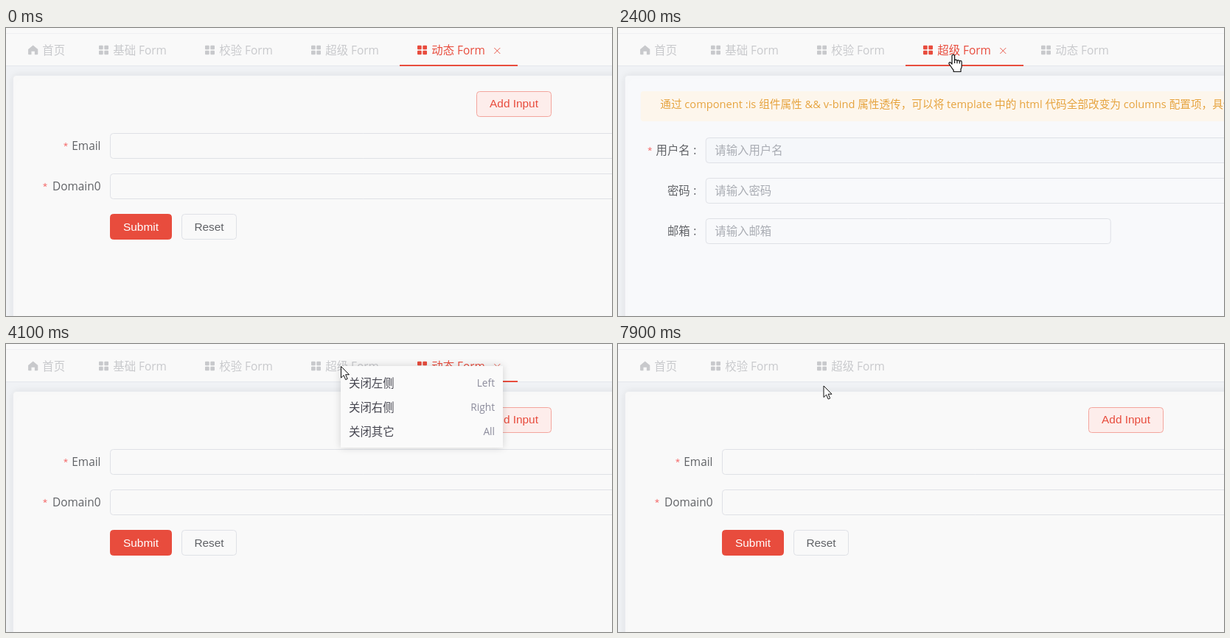
These frames come from a looping animation (822x392 px, 8 s). An HTML page with a canvas:

```html
<!DOCTYPE html>
<html lang="zh-CN">
<head>
<meta charset="utf-8">
<title>Dynamic form tabs</title>
<style>
  html, body { margin: 0; width: 100%; height: 100%; overflow: hidden; background: #f0f2f5; }
  canvas { display: block; }
</style>
</head>
<body>
<canvas id="stage" width="822" height="392"></canvas>
<script>
const ctx = document.getElementById('stage').getContext('2d');
const LOOP = 8000, W = 822, H = 392;
const UI = '"Open Sans","Noto Sans","Noto Sans CJK SC","Noto Sans CJK",sans-serif';
const ARIAL = '"Liberation Sans",Arial,sans-serif';
const RED = '#e84c3d', PAPER = '#f9f9f9', COOL = '#f8f9fb';
const BORDER = '#dfe1e6', LABEL = '#606266', HINT = '#a8abb2';

// CSS "ease" curve
function ease(x) {
  if (x <= 0) return 0;
  if (x >= 1) return 1;
  const bez = (a, b, u) => 3 * a * u * (1 - u) ** 2 + 3 * b * u * u * (1 - u) + u ** 3;
  let lo = 0, hi = 1;
  for (let i = 0; i < 18; i++) {
    const mid = (lo + hi) / 2;
    if (bez(0.25, 0.25, mid) < x) lo = mid; else hi = mid;
  }
  return bez(0.1, 1, lo);
}
const ramp = (t, start, dur = 300) => ease((t - start) / dur);
const pulse = (t, on, off) => ramp(t, on) - ramp(t, off);
const mix = (a, b, k) => a + (b - a) * k;
const mixRGB = (a, b, k) => `rgb(${a.map((v, i) => Math.round(mix(v, b[i], k)))})`;

function text(str, x, y, color, size = 15.4, align = 'left', family = UI) {
  ctx.font = `${size}px ${family}`;
  ctx.textAlign = align;
  ctx.fillStyle = color;
  ctx.fillText(str, x, y);
}
function rect(x, y, w, h, color) {
  ctx.fillStyle = color;
  ctx.fillRect(x, y, w, h);
}
function box(x, y, w, h, fill, stroke, r = 4) {
  ctx.beginPath();
  ctx.roundRect(x + 0.5, y + 0.5, w - 1, h - 1, r);
  ctx.fillStyle = fill;
  ctx.fill();
  ctx.lineWidth = 1;
  ctx.strokeStyle = stroke;
  ctx.stroke();
}
function shadowed(blur, color, draw) {
  ctx.save();
  ctx.shadowBlur = blur;
  ctx.shadowColor = color;
  draw();
  ctx.restore();
}

// Tabs
const tabs = [
  { name: '首页', home: true, width: 96 },
  { name: '基础 Form', closed: 7400 },
  { name: '校验 Form', hover: t => pulse(t, 5550, 6750) },
  { name: '超级 Form',
    active: t => pulse(t, 2060, 2960),
    hover: t => pulse(t, 1460, 2600) + pulse(t, 3480, 3780) },
  { name: '动态 Form', closed: 4950,
    active: t => 1 - pulse(t, 2060, 2960),
    hover: t => pulse(t, 2640, 3480) }
];

function gridIcon(x, y, color) {
  ctx.fillStyle = color;
  ctx.beginPath();
  for (const dx of [0, 7.3]) for (const dy of [0, 7]) ctx.roundRect(x + dx, y + dy, 5.7, 5.5, 1);
  ctx.fill();
}
function homeIcon(x, y, color) {
  ctx.fillStyle = color;
  ctx.fill(new Path2D(`M${x + 6.7} ${y}l6.6 5.6v6.2q0 1-1 1h-3.4v-4.6h-4.4v4.6h-3.4q-1 0-1-1v-6.2z`));
}
function cross(x, y, color, alpha) {
  ctx.save();
  ctx.globalAlpha *= alpha;
  ctx.strokeStyle = color;
  ctx.lineWidth = 0.9;
  ctx.beginPath();
  ctx.moveTo(x - 4, y - 4); ctx.lineTo(x + 4, y + 4);
  ctx.moveTo(x + 4, y - 4); ctx.lineTo(x - 4, y + 4);
  ctx.stroke();
  ctx.restore();
}
function drawTabs(t) {
  rect(0, 0, W, 51, PAPER);
  rect(0, 7, W, 1, '#eff0f2');
  rect(0, 51, W, 1, '#e4e7ed');
  const current = t < 2050 || t >= 2950 ? tabs[4] : tabs[3];
  let left = 6;
  for (const tab of tabs) {
    if (t >= tab.closed) continue;
    const a = tab.active ? tab.active(t) : 0;
    const h = tab.hover ? tab.hover(t) : 0;
    const color = mixRGB([200, 201, 204], [232, 76, 61], a);
    const x = left + 24 - 8 * h * (1 - a);
    (tab.home ? homeIcon : gridIcon)(x, tab.home ? 23.5 : 23.7, color);
    text(tab.name, x + 19.3, 36, color);
    cross(x + 108.3, 31, color, Math.max(a, h));
    const base = tab.width || 144;
    const growth = tab === current ? a ** 0.35 : a;
    if (tab === current) rect(left, 50, base + 16 * growth, 2, RED);
    left += base + 16 * growth;
  }
}

// Pages
function card(fill) {
  shadowed(11, 'rgba(0,0,0,.07)', () => box(9, 64, W + 40, H, fill, '#e9ebef'));
}
function input(x, y, w, fill) {
  box(x, y, w, 35, fill, BORDER);
}
function star(x, y) {
  text('*', x, y, '#f56c6c', 15.4, 'left', ARIAL);
}
function dynamicPage() {
  card(PAPER);
  box(638, 86, 102, 35, '#fdedeb', '#f3a59d');
  text('Add Input', 689, 108, RED, 15.4, 'center', ARIAL);
  [['Email', 143, 78], ['Domain0', 198, 50]].forEach(([label, y, starX]) => {
    star(starX, y + 23);
    text(label, 128.5, y + 23, LABEL, 15.4, 'right');
    input(141, y, W, PAPER);
  });
  box(141, 253, 84, 35, RED, RED);
  text('Submit', 183, 276, '#fff', 15.4, 'center', ARIAL);
  box(238, 253, 75, 35, PAPER, BORDER);
  text('Reset', 275.5, 276, LABEL, 15.4, 'center', ARIAL);
}
function superPage() {
  card(COOL);
  ctx.fillStyle = '#fdf6ec';
  ctx.beginPath();
  ctx.roundRect(31, 86, W, 41, 4);
  ctx.fill();
  text('通过 component :is 组件属性 && v-bind 属性透传，可以将 template 中的 html 代码全部改变为 columns 配置项，具体配置',
    57.5, 109, '#e6a23c', 14.65);
  star(40.5, 172);
  [['用户名', 149, W, '#f5f7fa'], ['密码', 204, W, COOL], ['邮箱', 259, 550, COOL]].forEach(([label, y, w, fill]) => {
    text(label, 98, y + 23, LABEL, 15.4, 'right');
    text(':', 102.5, y + 23, LABEL);
    input(119, y, w, fill);
    text('请输入' + label, 131.5, y + 23, HINT);
  });
}

const FADE = 200, GAP = 40;
const switches = [
  { at: 1985, from: dynamicPage, to: superPage },
  { at: 2888, from: superPage, to: dynamicPage }
];
function drawPage(t) {
  rect(0, 52, W, H, '#f0f2f5');
  let page = dynamicPage, alpha = 1, shift = 0;
  for (const s of switches) {
    if (t < s.at) break;
    const leave = ramp(t, s.at, FADE), enter = ramp(t, s.at + FADE + GAP, FADE);
    if (t < s.at + FADE) [page, alpha, shift] = [s.from, 1 - leave, 30 * leave];
    else [page, alpha, shift] = [s.to, enter, -30 * (1 - enter)];
  }
  ctx.save();
  ctx.beginPath();
  ctx.rect(shift < -0.5 ? 7 : 0, 52, W, H);
  ctx.clip();
  ctx.globalAlpha = alpha;
  ctx.translate(shift, 0);
  page();
  ctx.restore();
}

// Context menu
const menus = [
  { x: 454, y: 30, open: 3780, close: 4890 },
  { x: 313, y: 36, open: 5880, close: 7390 }
];
const entries = [['关闭左侧', 'Left'], ['关闭右侧', 'Right'], ['关闭其它', 'All']];
function drawMenu(t, p) {
  const m = menus.find(m => t >= m.open && t < m.close);
  if (!m) return;
  shadowed(10, 'rgba(0,0,0,.16)', () => rect(m.x, m.y, 220, 111, '#fafafa'));
  const hot = Math.floor((p.y - m.y - 7) / 33);
  entries.forEach(([label, key], i) => {
    const top = m.y + 7 + 33 * i;
    if (i === hot) rect(m.x, top, 220, 33, '#f1f1f1');
    text(label, m.x + 11, top + 22, '#45454f');
    text(key, m.x + 209, top + 21, '#8c8c9c', 13.7, 'right');
  });
}

// Pointer: time, x, y of the hot spot
const path = [
  [100, 513, 184], [500, 718, 134], [900, 606, 51], [1400, 537, 33], [1700, 455, 36],
  [2480, 455, 36], [2820, 627, 34], [3150, 627, 34], [3720, 454, 30], [4120, 454, 30],
  [4500, 567, 91], [5130, 567, 91], [5700, 319, 36], [6690, 319, 36], [7100, 398, 57],
  [7620, 398, 57], [7900, 278.5, 56.5], [8000, 278.5, 56.5]
];
function pointer(t) {
  const i = Math.max(1, path.findIndex(k => k[0] > t));
  const [t0, x0, y0] = path[i - 1], [t1, x1, y1] = path[i];
  const k = Math.min(1, Math.max(0, (t - t0) / (t1 - t0)));
  const s = k * k * (3 - 2 * k);
  return { x: mix(x0, x1, s), y: mix(y0, y1, s) };
}
const ARROW = new Path2D('M.5.5V16l3.6-3.4 2.6 5.9 2.5-1.1-2.6-5.7h4.9z');
const HAND = new Path2D('M-2 1.8Q-2 .4-.2.4T1.6 1.8V8q.5-.8 1.7-.8T5 8.6q.5-.7 1.6-.7 1.3 0 1.7 1.3.5-.6 1.4-.6 1.5 0 1.5 1.8v5.8q0 2-1.2 3.7V23.5H.2V21.5Q-1.5 19.5-3 17L-5.8 13.2Q-6.6 11.8-5.6 11T-3.5 11.4L-2 13.2z');
const FOLDS = new Path2D('M1.6 8v4M5 8.6v3.6M8.3 9.2v3.2');
function drawPointer(t, p) {
  if (t < 100) return;
  const hand = p.y < 51 && !(t >= 3780 && t < 4900) && t < 6750;
  ctx.save();
  ctx.translate(p.x, p.y);
  ctx.lineJoin = 'round';
  ctx.lineWidth = hand ? 1.2 : 1;
  ctx.fillStyle = '#fff';
  ctx.strokeStyle = '#111';
  ctx.fill(hand ? HAND : ARROW);
  ctx.stroke(hand ? HAND : ARROW);
  if (hand) ctx.stroke(FOLDS);
  ctx.restore();
}

function frame(now) {
  const t = now % LOOP, p = pointer(t);
  drawPage(t);
  drawTabs(t);
  drawMenu(t, p);
  drawPointer(t, p);
  requestAnimationFrame(frame);
}
requestAnimationFrame(frame);
</script>
</body>
</html>
```
